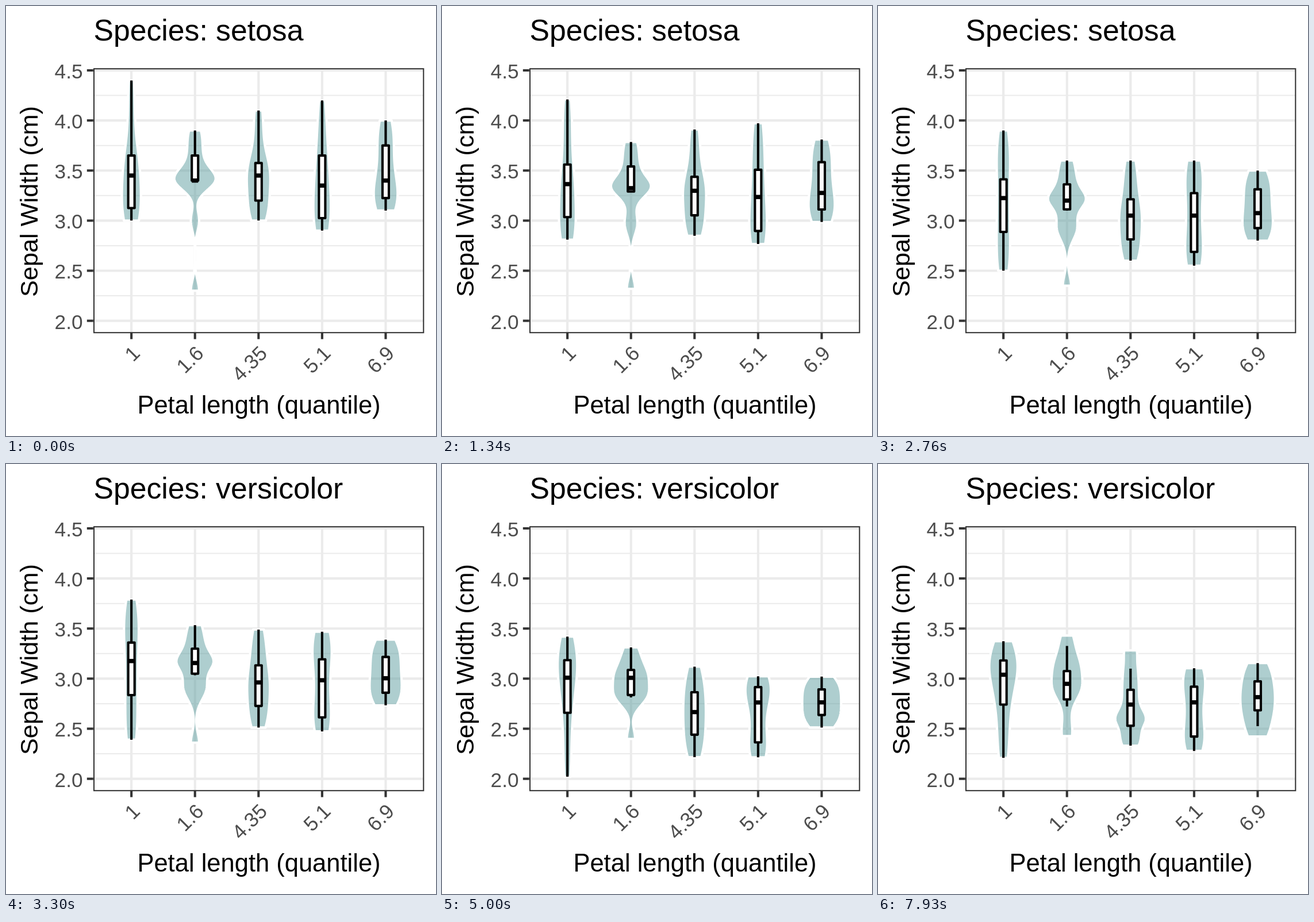
These frames come from a looping animation (748 px wide and 748 px high, 8 s). An HTML page:

```html
<!DOCTYPE html>
<html lang="en">
<head>
<meta charset="utf-8">
<title>Sepal width by species</title>
<style>
  html, body { margin: 0; width: 100%; height: 100%; overflow: hidden; background: #fff; }
  svg { display: block; width: 100vw; height: 100vh; }
  text { font-family: "Liberation Sans", Arial, sans-serif; font-kerning: none; }
</style>
</head>
<body>
<svg id="plot" viewBox="0 0 748 748"></svg>
<script>
const LABELS = ['1', '1.6', '4.35', '5.1', '6.9'];
const LEFT = 151.8, RIGHT = 726.8, TOP = 108.5, BOTTOM = 568.5;
const UNIT = (RIGHT - LEFT) / 5.2, LW = 4.1, ROWS = 256, LOOP = 8000;
const SPREAD = 0.45 * UNIT / 2.61; // half width per unit of density

const px = i => LEFT + (i + 0.6) * UNIT;
const py = v => BOTTOM - (v - 1.88) / 2.64 * (BOTTOM - TOP);
const mix = (a, b, t) => a + (b - a) * t;

// One column: box summary in mm (low, quartiles, high) and any outliers.
// Ten values spread evenly through the summary give the violin's density.
function column(summary, ...outliers) {
  const box = summary.map(v => v / 10), n = 10, m = n - outliers.length;
  const values = outliers.map(v => v / 10);
  for (let i = 0; i < m; i++) {
    const p = 4 * i / (m - 1), k = Math.min(3, Math.floor(p));
    values.push(mix(box[k], box[k + 1], p - k));
  }
  const mean = values.reduce((a, b) => a + b) / n;
  const sd = Math.sqrt(values.reduce((s, x) => s + (x - mean) ** 2, 0) / (n - 1));
  const bw = 0.9 * Math.min(sd, (box[3] - box[1]) / 1.34) * n ** -0.2;
  const low = Math.min(...values), high = Math.max(...values);
  const rows = Array.from({ length: ROWS }, (_, i) => {
    const y = mix(low, high, i / (ROWS - 1));
    const sum = values.reduce((s, x) => s + Math.exp(-0.5 * ((y - x) / bw) ** 2), 0);
    return [y, sum / (n * bw * Math.sqrt(2 * Math.PI))];
  });
  return { box, rows };
}

const states = [
  { name: 'setosa', cols: [
    column([30, 31.25, 34.5, 36.5, 44]),
    column([34, 34, 34, 36.5, 39], 23, 30),
    column([30, 32, 34.5, 35.75, 41]),
    column([29, 30.25, 33.5, 36.5, 42]),
    column([31, 32.25, 34, 37.5, 40])] },
  { name: 'versicolor', cols: [
    column([20, 26.5, 30, 31.75, 34]),
    column([28, 28.25, 30, 30.75, 33], 24),
    column([22, 24.25, 26.5, 28.5, 31]),
    column([22, 23.5, 27.5, 29, 30]),
    column([25, 26.25, 27.5, 28.75, 30])] },
  { name: 'virginica', cols: [
    column([28, 30, 31.5, 32, 33]),
    column([25, 27, 28, 30.75, 34], 38),
    column([27, 28.25, 30, 30, 31], 38),
    column([25, 26.25, 28, 29.75, 34]),
    column([26, 28.5, 30, 32.5, 36], 22)] }
];

const svg = document.getElementById('plot');
function add(tag, attrs, text) {
  const el = document.createElementNS('http://www.w3.org/2000/svg', tag);
  for (const k in attrs) el.setAttribute(k, attrs[k]);
  if (text) el.textContent = text;
  return svg.appendChild(el);
}
const line = (d, stroke, width) => add('path', { d, stroke, 'stroke-width': width, fill: 'none' });
const label = (x, y, size, fill, anchor, text, angle = 0) => add('text', {
  'font-size': size, fill, 'text-anchor': anchor, transform: `translate(${x} ${y}) rotate(${angle})`
}, text);

// Grid
for (let v = 2.25; v < 4.5; v += 0.5) line(`M${LEFT} ${py(v)}H${RIGHT}`, '#ebebeb', LW / 2);
for (let v = 2; v <= 4.5; v += 0.5) line(`M${LEFT} ${py(v)}H${RIGHT}`, '#ebebeb', LW);
LABELS.forEach((_, i) => line(`M${px(i)} ${TOP}V${BOTTOM}`, '#ebebeb', LW));

// Marks
const violins = LABELS.map(() => add('path', {
  fill: '#5f9ea0', 'fill-opacity': 0.5, stroke: '#fff', 'stroke-width': LW, 'stroke-linejoin': 'round'
}));
const boxes = LABELS.map(() => ({
  whisker: line('', '#000', LW),
  body: add('path', { fill: '#fff', stroke: '#000', 'stroke-width': LW, 'stroke-linejoin': 'round' }),
  median: line('', '#000', LW * 1.8)
}));

// Frame, axes and titles
add('rect', {
  x: 153, y: 109.2, width: 573.3, height: 459,
  fill: 'none', stroke: '#333', 'stroke-width': LW / 2
});
for (let v = 2; v <= 4.5; v += 0.5) {
  line(`M${LEFT - 11} ${py(v)}h11`, '#333', LW);
  label(133.5, py(v) + 14, 35.2, '#4d4d4d', 'end', v.toFixed(1));
}
LABELS.forEach((s, i) => {
  line(`M${px(i)} ${BOTTOM}v11`, '#333', LW);
  label(px(i) + 17, 606.5, 35.2, '#4d4d4d', 'end', s, -45);
});
label(440, 709, 43.5, '#000', 'middle', 'Petal length (quantile)');
label(54.5, 340, 43.3, '#000', 'middle', 'Sepal Width (cm)', -90);
const title = label(152.5, 60, 51.7, '#000', 'start', ' ');

function draw(from, to, t) {
  title.textContent = 'Species: ' + (t > 0.5 ? to : from).name;
  LABELS.forEach((_, i) => {
    const a = from.cols[i], b = to.cols[i], x = px(i), w = 0.05 * UNIT;
    const left = [], right = [];
    a.rows.forEach(([ya, da], k) => {
      const [yb, db] = b.rows[k];
      const y = py(mix(ya, yb, t)).toFixed(2), half = mix(da, db, t) * SPREAD;
      left.push(`${(x - half).toFixed(2)} ${y}`);
      right.push(`${(x + half).toFixed(2)} ${y}`);
    });
    violins[i].setAttribute('d', `M${left.concat(right.reverse()).join('L')}Z`);

    const [lo, q1, mid, q3, hi] = a.box.map((v, k) => py(mix(v, b.box[k], t)));
    boxes[i].whisker.setAttribute('d', `M${x} ${lo}V${q1}M${x} ${q3}V${hi}`);
    boxes[i].body.setAttribute('d', `M${x - w} ${q3}H${x + w}V${q1}H${x - w}Z`);
    boxes[i].median.setAttribute('d', `M${x - w} ${mid}H${x + w}`);
  });
}

// Steps come in threes lasting 20, 20 and 100 ms
function steps(ms) {
  const r = ms % 140;
  return 3 * Math.floor(ms / 140) + (r < 20 ? 0 : r < 40 ? 1 : 2);
}

let shown = '';
function tick() {
  const ms = performance.now() % LOOP;
  const phase = ms < 6770 ? 0 : 1;
  const n = phase ? steps(ms - 6770) : ms < 500 ? 0 : Math.min(100, 1 + steps(ms - 500));
  const key = phase + ':' + n;
  if (key !== shown) {
    shown = key;
    draw(states[phase], states[phase + 1], n / 100);
  }
  requestAnimationFrame(tick);
}
tick();
</script>
</body>
</html>
```
